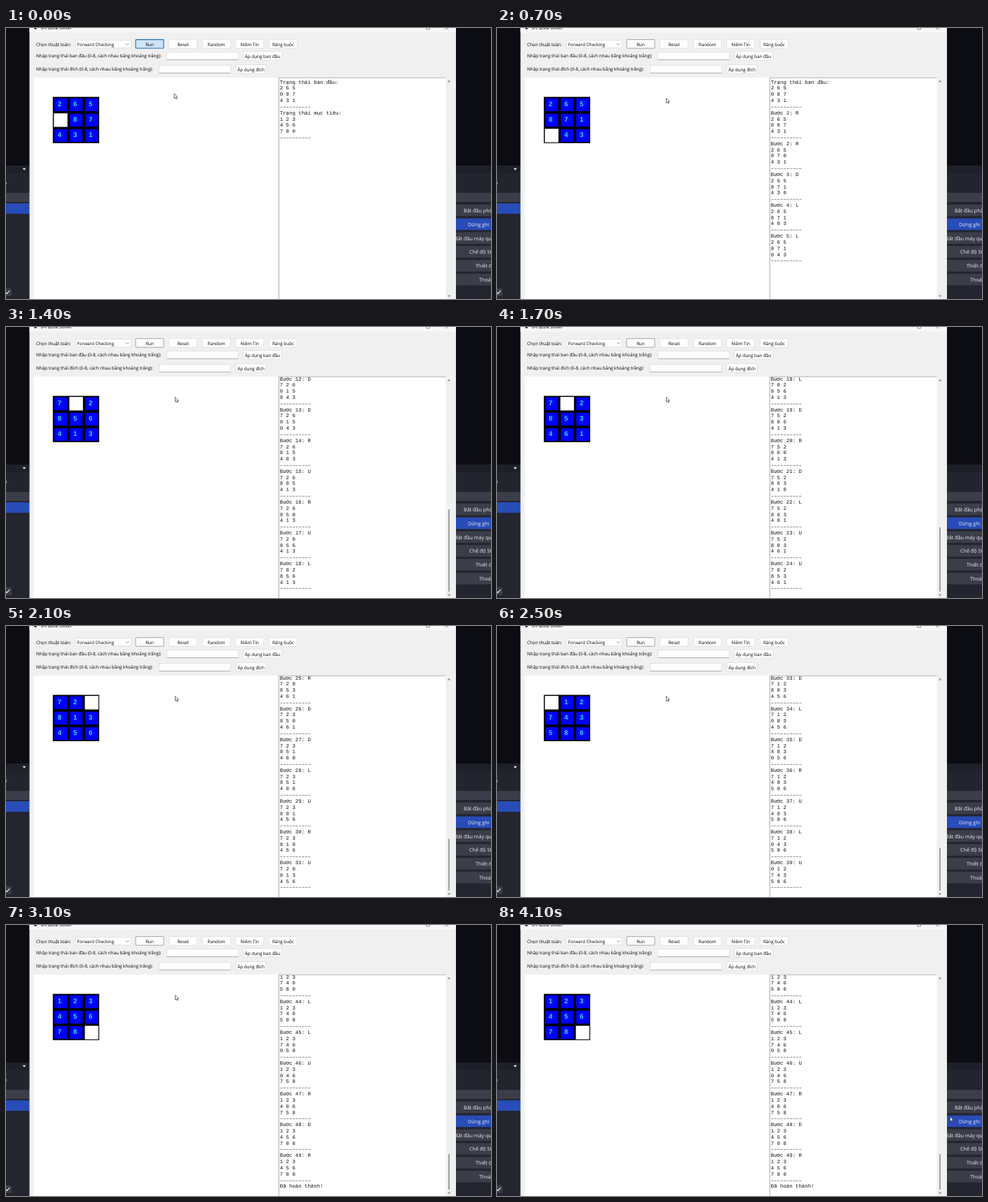
Write an HTML page that moves like this. It is 692 by 388 pixels and loops after 4200 ms.

```html
<!DOCTYPE html>
<html lang="vi">
<head>
<meta charset="utf-8">
<title>8-Puzzle</title>
<style>
  html, body { margin: 0; width: 100%; height: 100%; overflow: hidden; background: #0c0d13; }
  svg { display: block; width: 692px; height: 388px; }
  text { white-space: pre; text-rendering: geometricPrecision; }
  .ui { font: 6.32px "Open Sans", sans-serif; fill: #000; }
  .mid { text-anchor: middle; }
  .field { fill: #fefefe; stroke: #d6d6d6; stroke-width: .6; }
  .side { font: 7.2px "Open Sans", sans-serif; fill: #ececf0; }
  .log { font: 7.35px "Liberation Mono", monospace; fill: #111; }
  .tile { font: bold 9.6px "Liberation Sans", sans-serif; fill: #30dfea; text-anchor: middle; }
  .line { fill: none; stroke: #666; stroke-width: .7; }
  .edge { fill: none; stroke: #a4a4a4; stroke-width: .8; }
</style>
</head>
<body>
<svg viewBox="0 0 692 388">
  <defs>
    <clipPath id="logClip"><rect x="390" y="72" width="237" height="316"/></clipPath>
  </defs>

  <!-- dark application behind the window -->
  <g id="backdrop">
    <rect width="692" height="388" fill="#0c0d13"/>
    <rect y="197" width="692" height="11" fill="#1d2029"/>
    <rect y="208" width="692" height="27" fill="#22252e"/>
    <rect y="235.5" width="692" height="14" fill="#3b3e49"/>
    <rect y="249.5" width="692" height="139" fill="#23262f"/>
    <rect y="251" width="34" height="15" fill="#284cb8"/>
    <path d="M23.5 200.7h5l-2.5 3z" fill="#e8e8ee"/>
    <text class="side" x="-3" y="224">o</text>
    <rect x="-5" y="372.5" width="13" height="11.5" rx="2" fill="#3b3e49"/>
    <path d="M-1 378l2.2 2.4 4-4.4" fill="none" stroke="#fff" stroke-width="1.1"/>
  </g>
  <g id="sideButtons"></g>

  <!-- window -->
  <rect x="33.5" width="608.5" height="388" fill="#f0f0f0"/>
  <rect x="33.5" width="608.5" height="6.5" fill="#f7f7f8"/>
  <circle cx="42" cy="0" r="2" fill="#333"/>
  <text class="ui" x="50" y="2.3">8-Puzzle Solver</text>
  <path class="line" d="M600 -2v4h4.5v-4M626 -2.5l5 5m0 -5l-5 5"/>

  <text class="ui" x="43" y="25.6">Chọn thuật toán:</text>
  <rect class="field" x="99" y="17.3" width="79.5" height="11.3"/>
  <text class="ui" x="101.5" y="25.6">Forward Checking</text>
  <path class="line" d="M171 22.2l2.2 2.2 2.2 -2.2"/>
  <text class="ui" x="43" y="42.3">Nhập trạng thái ban đầu (0-8, cách nhau bằng khoảng trắng):</text>
  <rect class="field" x="229.5" y="34.5" width="102" height="11"/>
  <path class="edge" d="M229.5 45.5h102"/>
  <text class="ui" x="43" y="61.3">Nhập trạng thái đích (0-8, cách nhau bằng khoảng trắng):</text>
  <rect class="field" x="218.5" y="53.5" width="102" height="11"/>
  <path class="edge" d="M218.5 64.5h102"/>
  <g id="buttons"></g>

  <rect x="39.5" y="71" width="348.5" height="317" fill="#fff"/>
  <rect x="389" y="71" width="238.5" height="317" fill="#fff"/>
  <path class="edge" d="M627.5 71.3H389.4V388"/>
  <path d="M629.8 77.6h4.6l-2.3 -3.2zM629.8 382.4h4.6l-2.3 3.2z" fill="#989898"/>
  <rect id="thumb" x="631.3" width="1.5" rx=".7" fill="#858585"/>

  <rect x="66.8" y="98.6" width="66.2" height="66.2" fill="#000"/>
  <g id="board"></g>
  <g clip-path="url(#logClip)"><g id="log"></g></g>
  <path id="cursor" d="M0 0v6.8l1.6 -1.4 1.1 2.3 1.1 -.5 -1.1 -2.3h2.1z"
        fill="#fff" stroke="#111" stroke-width=".6"/>
</svg>

<script>
const LOOP = 4200, TICK = 100, RUN_AT = 500;
const LINE = 8.82, VIEW = 305.6, LOG_TOP = 79.6;
const MOVES = "RRDLLURRULLDDRURULDRDLUURDDLURULDLDRULURRDDLLURDR";
const SHIFT = { U: -3, D: 3, L: -1, R: 1 };
// time, x, y of the pointer
const PATH = [
  [0, 240, 94], [300, 241.5, 100.5], [3400, 241.5, 100.5], [3500, 251, 104],
  [3600, 298, 124], [3700, 395, 167], [3800, 492, 209], [3900, 561, 237],
  [4000, 619, 260], [4100, 646.5, 274.5], [LOOP, 646.5, 274.5]
];

const $ = id => document.getElementById(id);

function add(parent, tag, attrs, text = "") {
  const el = document.createElementNS("http://www.w3.org/2000/svg", tag);
  for (const key in attrs) el.setAttribute(key, attrs[key]);
  el.textContent = text;
  return parent.appendChild(el);
}

function addButton(label, x, y, w) {
  const box = add($("buttons"), "rect", { class: "field", x, y, width: w, height: 12.4, rx: .8 });
  add($("buttons"), "text", { class: "ui mid", x: x + w / 2, y: y + 9 }, label);
  return box;
}

const [runBox] = ["Run", "Reset", "Random", "Niềm Tin", "Ràng buộc"]
  .map((label, i) => addButton(label, 185 + 47.6 * i, 16.6, 40));
addButton("Áp dụng ban đầu", 338.5, 33.5, 55);
addButton("Áp dụng đích", 328, 52.5, 43);

[["Bắt đầu phát trực tiếp", 653], ["Dừng ghi", 659], ["Bắt đầu máy quay ảo", 640],
 ["Chế độ Studio", 661], ["Thiết đặt", 670], ["Thoát", 675]].forEach(([label, x], i) => {
  const y = 252.8 + 19.8 * i;
  add($("sideButtons"), "rect", { x: 630, y, width: 80, height: 16.6, fill: i === 1 ? "#284cb8" : "#3b3e49" });
  add($("sideButtons"), "text", { class: "side", x, y: y + 11.1 }, label);
});

const tiles = Array.from({ length: 9 }, (_, i) => {
  const x = 68.3 + 22.1 * (i % 3), y = 100.1 + 22.1 * Math.floor(i / 3);
  return {
    box: add($("board"), "rect", { x, y, width: 19.4, height: 19.4 }),
    digit: add($("board"), "text", { class: "tile", x: x + 8.2, y: y + 11.6 })
  };
});
const rows = Array.from({ length: 38 }, () => add($("log"), "text", { class: "log", x: 390.8 }));

const states = [[2, 6, 5, 0, 8, 7, 4, 3, 1]];
for (const move of MOVES) {
  const next = [...states.at(-1)], gap = next.indexOf(0), to = gap + SHIFT[move];
  [next[gap], next[to]] = [next[to], 0];
  states.push(next);
}

const block = (title, s) =>
  [title, ...[0, 3, 6].map(i => s.slice(i, i + 3).join(" ")), "–".repeat(10)];
const opening = block("Trạng thái ban đầu:", states[0]);
const goal = block("Trạng thái mục tiêu:", states.at(-1));
const history = states.flatMap((s, i) => i ? block(`Bước ${i}: ${MOVES[i - 1]}`, s) : opening);

function drawBoard(state) {
  state.forEach((n, i) => {
    tiles[i].box.setAttribute("fill", n ? "#0000f8" : "#fff");
    tiles[i].box.setAttribute("stroke", n ? "#000" : "none");
    tiles[i].digit.textContent = n || "";
  });
}

function drawLog(lines) {
  const offset = Math.max(0, lines.length * LINE - VIEW);
  const first = Math.max(0, Math.floor(offset / LINE) - 1);
  rows.forEach((row, i) => {
    row.textContent = lines[first + i] || "";
    row.setAttribute("y", LOG_TOP + (first + i) * LINE - offset);
  });
  const height = offset ? 9.8 + 10390 / (lines.length + 1) : 0;
  $("thumb").setAttribute("height", height);
  $("thumb").setAttribute("y", 379 - height);
}

function drawCursor(t) {
  const i = PATH.findIndex(p => p[0] > t);
  const [t0, x0, y0] = PATH[i - 1], [t1, x1, y1] = PATH[i];
  const k = (t - t0) / (t1 - t0);
  $("cursor").setAttribute("transform", `translate(${x0 + (x1 - x0) * k} ${y0 + (y1 - y0) * k})`);
}

function draw(t) {
  const running = t >= RUN_AT;
  const progress = running ? Math.floor(5.7 + (t - 700) * 13 / 700) : 0;
  const step = Math.min(progress, MOVES.length);
  const lines = running ? history.slice(0, 5 + 5 * step) : [...opening, ...goal];
  if (progress > MOVES.length) lines.push("Đã hoàn thành!");
  drawBoard(states[step]);
  drawLog(lines);
  drawCursor(t);
  runBox.style.fill = running ? "#fdfdfd" : "#cfe4f7";
  runBox.style.stroke = running ? "#8b9299" : "#1f6fb5";
  runBox.style.strokeWidth = running ? .8 : 1.1;
}

function frame() {
  draw(Math.floor(performance.now() % LOOP / TICK) * TICK);
  requestAnimationFrame(frame);
}
frame();
</script>
</body>
</html>
```
